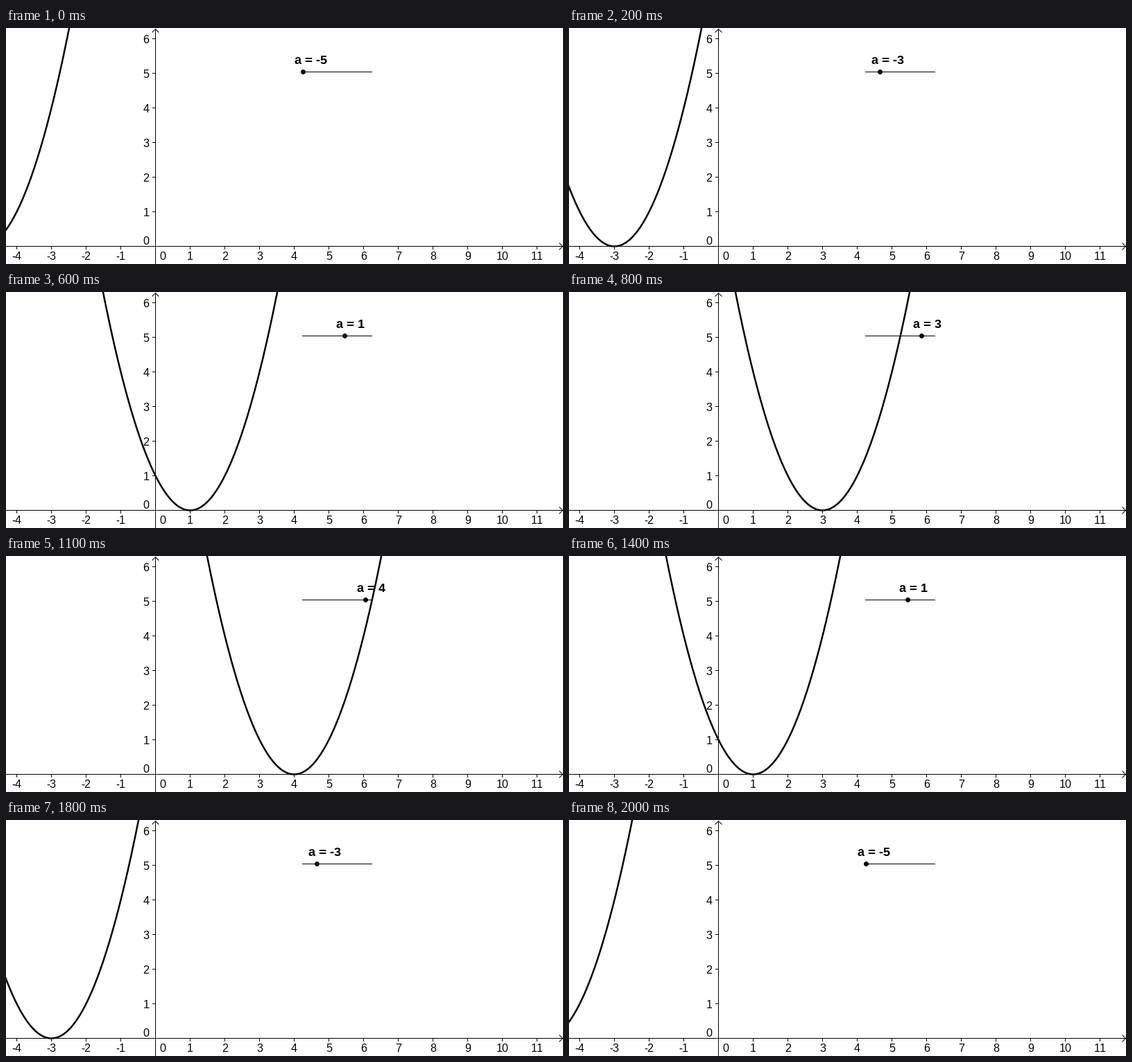
Recreate the animation shown at these times as a matplotlib script. Size 803 by 341 pixels, loop 2100 ms.

```python
import numpy as np
import matplotlib.pyplot as plt
from matplotlib.animation import FuncAnimation

W, H, DPI = 803, 341, 72        # at 72 dpi one point is one pixel
OX, OY, UNIT = 215.5, 315.5, 50  # origin and pixels per unit
FRAMES, STEP = 21, 100
SLIDER_X, SLIDER_Y = 427.5, 63.5

plt.rcParams.update({
    "font.family": "Liberation Sans",
    "text.hinting": "default",
    "text.hinting_factor": 1,
    "text.kerning_factor": 6,
})

fig = plt.figure(figsize=((W + 1e-6) / DPI, (H + 1e-6) / DPI), dpi=DPI,
                 facecolor="white")
ax = fig.add_axes([0, 0, 1, 1])
ax.set_xlim(0, W)
ax.set_ylim(H, 0)
ax.axis("off")


def line(xs, ys, width=1, **kw):
    return ax.plot(xs, ys, color="black", lw=width, snap=False,
                   solid_capstyle="butt", **kw)[0]


def label(x, y, text, ha, size=16, **kw):
    return ax.text(x, y, text, ha=ha, va="baseline", fontsize=size,
                   color="black", **kw)


def draw_axes():
    line([0, W], [OY, OY])
    line([OX, OX], [1, H])
    line([OX - 5, OX, OX + 5], [6.5, 1.5, 6.5])
    line([W - 5.5, W - 0.5, W - 5.5], [OY - 5, OY, OY + 5])
    for n in range(-4, 12):
        x = OX + UNIT * n
        if n:
            line([x, x], [OY, OY + 4.5])
        label(x if n else x + 10, 334.8, str(n), "center")
    for n in range(7):
        y = OY - UNIT * n
        if n:
            line([OX - 4.5, OX], [y, y])
        label(206.4, y + 6 if n else y - 3, str(n), "right")


draw_axes()
line([SLIDER_X - 0.5, SLIDER_X + 100.5], [SLIDER_Y, SLIDER_Y])
curve = line([], [], 2.5, zorder=3)
knob = ax.plot([], [], "o", color="black", ms=7, mew=0, snap=False,
               zorder=4)[0]
caption = label(0, 52, "", "left", 18, weight="bold", zorder=4)

u = np.linspace(-2.7, 2.7, 241)


def update(i):
    a = 5 - abs(i - 10)
    curve.set_data(OX + UNIT * (a + u), OY - UNIT * u ** 2)
    x = SLIDER_X + 10 * (a + 5)
    knob.set_data([x], [SLIDER_Y])
    caption.set_x(x - 12)
    caption.set_text(f"a = {a}")
    return curve, knob, caption


anim = FuncAnimation(fig, update, frames=FRAMES, interval=STEP,
                     repeat=True, repeat_delay=0)
plt.show()
```
